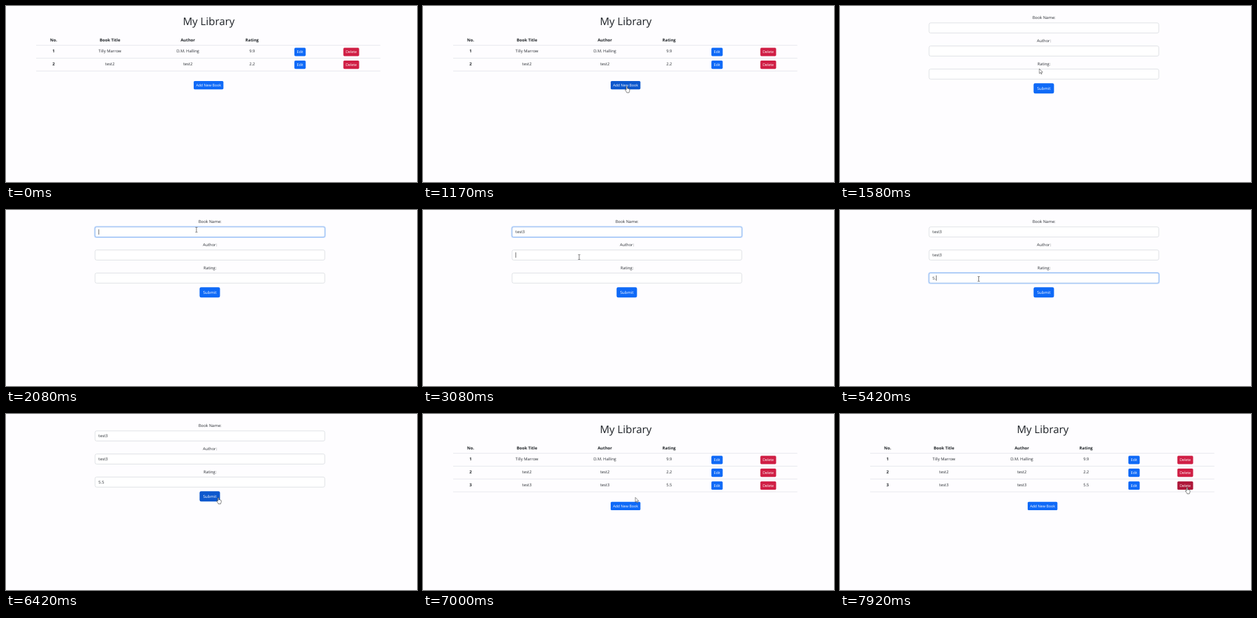
An HTML page that plays this animation: 600x258 px, repeating every 8000 ms.

```html
<!DOCTYPE html>
<html lang="en">
<head>
<meta charset="utf-8">
<title>My Library</title>
<style>
  html, body { margin: 0; width: 100%; height: 100%; overflow: hidden; background: #fefdff; }
  svg { display: block; width: 100vw; height: 100vh; }
  text { font-family: "Open Sans", "Noto Sans", sans-serif; font-size: 5.9px; fill: #2b2f34; text-rendering: geometricPrecision; white-space: pre; }
  .title { font-size: 15.4px; font-weight: 500; fill: #1d2126; }
  .bold { font-size: 6px; font-weight: 700; fill: #212529; }
  .mid { text-anchor: middle; }
  .small { font-size: 5.35px; }
  .light { fill: #fff; }
  .item { font-size: 4.9px; }
  .rule { stroke: #dfe1e5; stroke-width: .7; }
</style>
</head>
<body>
<svg id="stage" viewBox="0 0 600 258"></svg>
<script>
const LOOP = 8000, FPS = 12, FADE = 150;
const BLUE = ["#0f6af7", "#0d58cd"], RED = ["#d01f45", "#ae173a"];
const stage = document.getElementById("stage");

function add(parent, tag, attrs, content) {
  const el = document.createElementNS("http://www.w3.org/2000/svg", tag);
  for (const key in attrs) el.setAttribute(key, attrs[key]);
  if (content !== undefined) el.textContent = content;
  parent.append(el);
  return el;
}
const group = parent => add(parent, "g", {});
const label = (parent, x, y, content, cls = "mid") => add(parent, "text", { x, y, class: cls }, content);
const show = (el, on) => el.setAttribute("visibility", on ? "inherit" : "hidden");

function button(parent, x, y, w, h, caption, colors, cls = "small") {
  const rect = add(parent, "rect", { x, y, width: w, height: h, rx: cls ? 1.6 : 2.3 });
  label(parent, x + w / 2, y + h / 2 + (cls ? 2 : 2.2), caption, "mid light " + cls);
  return { rect, x, y, w, h, colors };
}

const inside = (b, x, y) => x >= b.x && x <= b.x + b.w && y >= b.y && y <= b.y + b.h;

// Library table
const ROW = 18.8;
const books = [
  ["1", "Tilly Marrow", "D.M. Halling", "9.9"],
  ["2", "test2", "test2", "2.2"],
  ["3", "test3", "test3", "5.5"]
];
const columns = [69.5, 151.7, 265.5, 359.3];

function makeList(count) {
  const g = group(stage), buttons = [];
  const rule = y => add(g, "line", { x1: 44, x2: 546.5, y1: y, y2: y, class: "rule" });
  label(g, 296, 28, "My Library", "mid title");
  ["No.", "Book Title", "Author", "Rating"].forEach((s, i) => label(g, columns[i], 52.2, s, "mid bold"));
  rule(57.6);
  books.slice(0, count).forEach((book, r) => {
    const dy = r * ROW;
    book.forEach((s, i) => label(g, columns[i], 68.3 + dy, s, i ? "mid" : "mid bold"));
    buttons.push(button(g, 421, 61.2 + dy, 16.5, 12.2, "Edit", BLUE));
    buttons.push(button(g, 492.5, 61.2 + dy, 23, 12.2, "Delete", RED));
    rule(76.5 + dy);
  });
  buttons.push(button(g, 274, 110 + (count - 2) * ROW, 43.4, 12.2, "Add New Book", BLUE));
  return { g, buttons, fields: [] };
}

// Entry form
const PITCH = 33.8;

function makeField(g, name, i) {
  const y = 24.8 + i * PITCH;
  const box = { x: 130, y, width: 335.4, height: 14.8, rx: 2.3 };
  label(g, 297.7, y - 5.6, name);
  const halo = add(g, "rect", { x: 128.6, y: y - 1.4, width: 338.2, height: 17.6, rx: 3.5, fill: "#c2dafe" });
  add(g, "rect", { ...box, fill: "#fff", stroke: "#d3d7dc", "stroke-width": .7 });
  const edge = add(g, "rect", { ...box, fill: "none", stroke: "#8cbafc", "stroke-width": .8 });
  const text = label(g, 135.1, y + 9.5, "", "");
  const caret = add(g, "rect", { y: y + 3.5, width: .6, height: 7.8, fill: "#222" });
  return { x: 130, y, w: 335.4, h: 14.8, halo, edge, text, caret };
}

function makeForm() {
  const g = group(stage);
  const fields = ["Book Name:", "Author:", "Rating:"].map((s, i) => makeField(g, s, i));
  return { g, fields, buttons: [button(g, 282.6, 113.3, 29.8, 14.9, "Submit", BLUE, "")] };
}

function makeMenu(parent, y, items) {
  const g = group(parent);
  add(g, "rect", { x: 167.8, y: y + .6, width: 29.4, height: 88.8, rx: 1, fill: "#000", opacity: .07 });
  add(g, "rect", { x: 168.3, y, width: 28.4, height: 88.6, rx: .8, fill: "#fff", stroke: "#d9dade", "stroke-width": .5 });
  add(g, "path", { d: `M174.4 ${y + .3}l2-2 2 2z`, fill: "#fff", stroke: "#e0e0e4", "stroke-width": .3 });
  items.forEach((s, i) => label(g, 172.9, y + 11.2 + i * 14.05, s, "item"));
  return g;
}

const listTwo = makeList(2), listThree = makeList(3), form = makeForm();
const menus = [
  { g: makeMenu(form.g, 76.3, ["test", "test2", "test3", "test5", "test23", "test4"]), on: 3250, off: 4170 },
  { g: makeMenu(form.g, 76.3 + PITCH, ["5.5", "2.2", "9.9", "4.5", "3.3", "8.8"]), on: 4500, off: 5170 }
];

const focusSpans = [[1920, 3080], [3080, 4340], [4340, 6250]];
const typing = [
  [[2250, "te"], [2420, "tes"], [2580, "test"], [2670, "test3"]],
  [[3500, "tes"], [3830, "test"], [4170, "test3"]],
  [[5170, "5"], [5250, "5."], [5420, "5.5"]]
];
const caretOff = [5000, 5170];

// Pointer: time, x, y
const path = [
  [80, 338, 250], [330, 321, 198], [580, 304, 140], [750, 298, 121], [920, 297.5, 117.5],
  [1420, 297.5, 117.5], [1580, 291, 92], [1750, 281, 42], [1920, 278, 29],
  [2750, 278, 29], [2920, 256, 48], [3080, 228, 69], [3250, 225.8, 71.5],
  [4340, 225.8, 71.5], [4420, 206, 97], [4500, 202.5, 101],
  [5920, 202.5, 101], [6080, 242, 107], [6250, 306, 120], [6330, 310, 122.3],
  [7250, 310, 122.3], [7330, 312.5, 122.3], [7420, 312.5, 122.3], [7500, 328, 134],
  [7580, 368, 151], [7670, 418, 160], [7750, 468, 144], [7830, 500, 114], [7920, 507.6, 106.6]
];
const hiddenSpans = [[0, 80], [2580, 2830], [4170, 4420]];
const within = (t, [a, b]) => t >= a && t < b;

const pointer = group(stage);
const shapes = { arrow: group(pointer), hand: group(pointer), beam: group(pointer) };
add(shapes.arrow, "path", {
  d: "M0 0v7l1.6-1.5 1.1 2.4 1.1-.5-1.1-2.3h2.2z",
  fill: "#fff", stroke: "#222", "stroke-width": .5
});
add(shapes.hand, "path", {
  d: "M-.8 .6q.8-1 1.5 0v3q.7-.5 1.3.1.7-.4 1.2.3.9-.2 1 .8v2q-.2 1.2-.8 1.8v.9h-3.5v-.7l-2.3-3q-.3-1 .6-1.1l1 .9z",
  fill: "#fff", stroke: "#222", "stroke-width": .55, "stroke-linejoin": "round"
});
add(shapes.beam, "path", {
  d: "M-1.5-3.5h1.1l.4.4.4-.4h1.1M0-3.1v6.2M-1.5 3.5h1.1l.4-.4.4.4h1.1",
  fill: "none", stroke: "#222", "stroke-width": .6
});

function pointerAt(t) {
  const i = path.findIndex(p => p[0] > t);
  if (i === 0) return path[0].slice(1);
  if (i < 0) return path[path.length - 1].slice(1);
  const [a, ax, ay] = path[i - 1], [b, bx, by] = path[i];
  const k = (t - a) / (b - a);
  return [ax + (bx - ax) * k, ay + (by - ay) * k];
}

const ramp = (t, start) => Math.min(1, Math.max(0, (t - start) / FADE));

function drawField(field, i, t) {
  const [on, off] = focusSpans[i];
  const glow = ramp(t, on) * (1 - ramp(t, off));
  field.halo.setAttribute("opacity", glow);
  field.edge.setAttribute("opacity", glow);
  const step = typing[i].filter(s => s[0] <= t).pop();
  field.text.textContent = step ? step[1] : "";
  const width = step ? field.text.getComputedTextLength() : 0;
  field.caret.setAttribute("x", 135.1 + width);
  show(field.caret, within(t, [on, off]) && !within(t, caretOff));
}

function draw(t) {
  const page = t < 1330 ? listTwo : t < 6670 ? form : listThree;
  for (const p of [listTwo, listThree, form]) show(p.g, p === page);
  page.fields.forEach((f, i) => drawField(f, i, t));
  menus.forEach(m => show(m.g, page === form && within(t, [m.on, m.off])));

  const [x, y] = pointerAt(t);
  const visible = !hiddenSpans.some(s => within(t, s));
  let kind = page.fields.some(f => inside(f, x, y)) ? "beam" : "arrow";
  for (const b of page.buttons) {
    const hover = visible && inside(b, x, y);
    if (hover) kind = "hand";
    b.rect.setAttribute("fill", b.colors[hover ? 1 : 0]);
  }
  pointer.setAttribute("transform", `translate(${x} ${y})`);
  for (const name in shapes) show(shapes[name], visible && name === kind);
}

function snap(t) {
  const step = Math.floor((t + 7) * FPS / 1000) % (LOOP * FPS / 1000);
  return Math.floor(step * 100 / FPS) * 10;
}

const start = performance.now();
function tick() {
  draw(snap((performance.now() - start) % LOOP));
  requestAnimationFrame(tick);
}
tick();
</script>
</body>
</html>
```
